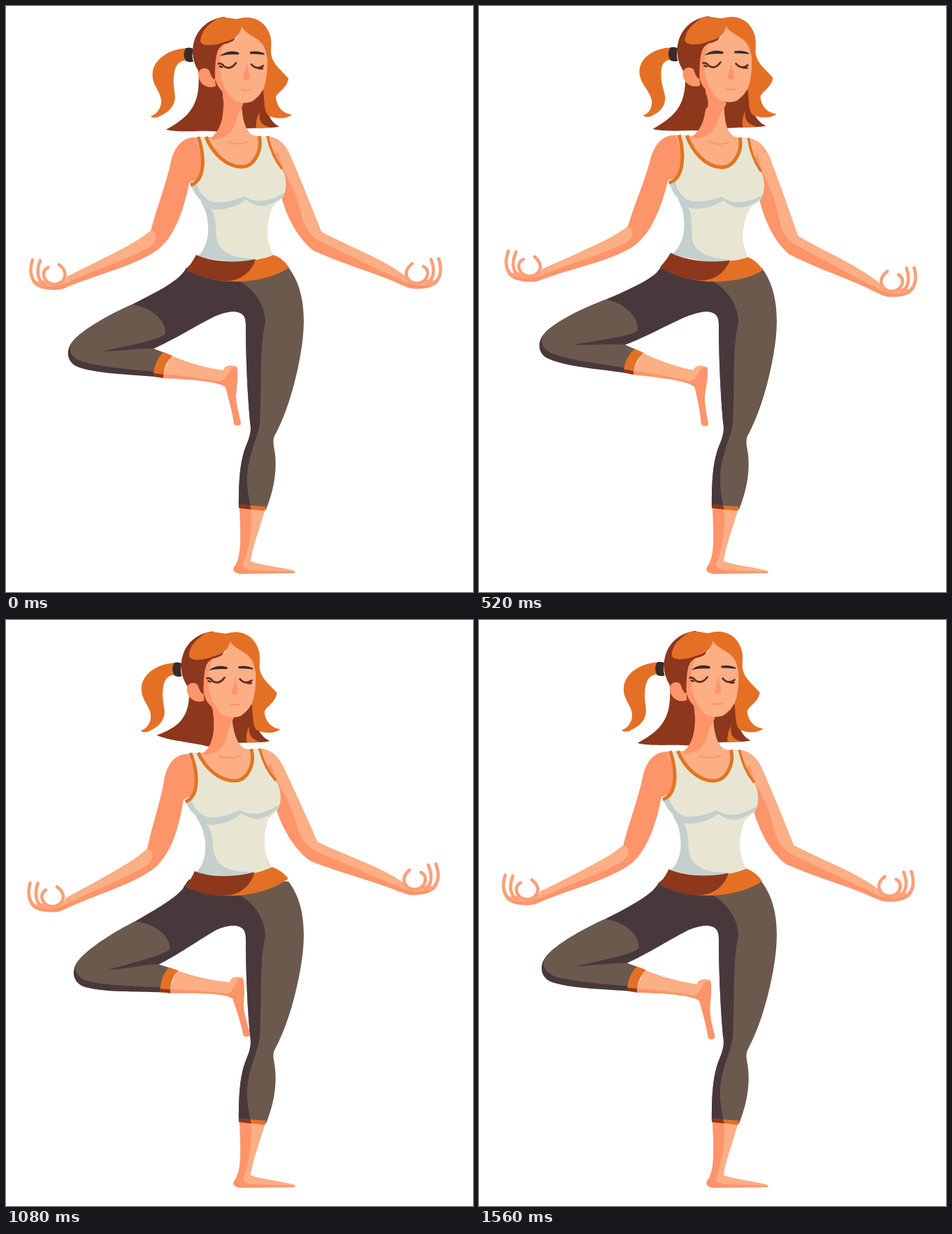
Animation of 668 by 838 pixels, one loop 1.6 s. Source, as an HTML page:

```html
<!DOCTYPE html>
<html lang="en">
<head>
<meta charset="utf-8">
<title>Tree pose</title>
<style>
  html, body { margin: 0; width: 100%; height: 100%; overflow: hidden; background: #fff; }
  svg { display: block; width: 668px; height: 838px; }
  .skin { fill: #fcae85; }
  .blush { fill: #fd946a; }
  .hair { fill: #e47025; }
  .brown { fill: #8d371c; }
  .cloth { fill: #6c594e; }
  .dusk { fill: #49383b; }
  .top { fill: #e8e6d2; }
  .fold { fill: #c3d0cd; }
  .ink { fill: #3b2a28; }
  .line { fill: none; stroke-linecap: round; stroke-linejoin: round; }
</style>
</head>
<body>
<svg viewBox="0 0 668 838">
  <defs>
    <g id="hand">
      <path class="blush" d="M93 386C85 390 83 396 70 397L52 394C44 396 39 393 36 386C35 401 52 406 70 406C82 406 86 402 94 399Z"/>
      <path class="skin" d="M93 385C85 389 83 395 70 397L50 392L42 396C52 403 72 403 92 394Z"/>
      <g class="line" stroke="#fc9f78" stroke-width="4.6">
        <path d="M38 363C33 379 35 392 47 399M49 364C43 379 45 392 55 399"/>
        <path d="M60 374C49 379 53 397 69 398C83 398 92 382 76 370"/>
      </g>
    </g>
  </defs>

  <!-- standing leg -->
  <path class="skin" d="M334 715L371 719C362 750 352 775 350 794C370 801 400 803 413 808C415 811 412 811 408 811L335 812C325 811 323 805 328 800C337 785 336 760 334 715Z"/>
  <path class="blush" d="M334 715L350 717C353 750 347 772 343 788C338 800 336 804 350 807L413 809C415 811 412 811 408 811L335 812C325 811 323 805 328 800C337 785 336 760 334 715Z"/>
  <path class="cloth" d="M262 371L404 374C428 405 430 450 421 500C412 550 398 590 384 615C382 620 382 625 384 635C389 665 382 695 372 720L333 717C333 680 334 650 345 625C350 612 351 605 349 595C345 550 343 500 343 455C343 442 337 438 327 437C318 437 310 439 303 442L270 440L254 382Z"/>
  <path class="dusk" d="M262 371L320 388C350 396 371 425 371 452C362 490 366 550 363 595C362 612 352 630 347 655C342 680 347 700 350 718L333 717C333 680 334 650 345 625C350 612 351 605 349 595C345 550 343 500 343 455C343 442 337 438 327 437C318 437 310 439 303 442L270 440L254 382Z"/>
  <path class="hair" d="M333 713L372 716L370 722L333 718Z"/>
  <path class="brown" d="M333 713L349 714L351 720L333 718Z"/>

  <!-- bent leg -->
  <g id="leg">
    <path class="skin" d="M236 500C265 512 290 518 311 521C312 514 322 512 330 516C333 530 329 545 329 560C330 575 335 590 336 597C335 601 328 601 326 597C324 580 318 560 314 545C305 537 270 534 222 532Z"/>
    <path class="blush" d="M222 526C260 529 295 535 306 537C316 535 317 525 321 520Q326 515 330 516C333 530 329 545 329 560C330 575 335 590 336 597C335 601 328 601 326 597C324 580 318 560 314 545C305 537 270 534 222 532Z"/>
    <path class="dusk" d="M258 374C250 390 230 402 180 427C150 440 110 462 95 480C85 492 87 508 100 515C125 526 180 527 212 530L228 498L211 490C240 478 280 452 303 442L310 436V394Z"/>
    <path class="cloth" d="M180 427C205 430 229 448 228 468C226 474 200 481 136 494C165 494 190 489 211 490L230 497L211 523C165 518 125 515 105 507C92 501 88 490 95 480C110 462 150 440 180 427Z"/>
    <path class="hair" d="M225 495L238 500C230 508 225 520 225 532L211 530C211 515 217 503 225 495Z"/>
    <path class="brown" d="M211 525L225 527V532L211 530Z"/>
  </g>

  <!-- hair behind the neck -->
  <g id="back">
    <g id="tail">
      <path class="hair" d="M258 61C236 62 215 74 210 92C205 113 222 122 221 138C220 150 212 156 206 158C208 161 214 161 219 158C233 152 241 142 241 130C240 118 238 110 240 98C242 84 248 79 258 78Z"/>
    </g>
    <path id="flap" class="brown" d="M275 92C279 140 265 158 229 178C250 183 280 178 302 180L322 175L318 120L290 100Z"/>
    <g id="lock">
      <path class="brown" d="M325 130L328 177C358 174 375 176 391 173C382 168 378 163 374 150L370 120Z"/>
      <path class="hair" d="M363 152C361 165 366 172 379 174L358 175C357 168 359 158 363 152Z"/>
    </g>
    <path class="hair" d="M345 17C367 18 381 34 379 62C378 82 392 90 404 104C402 118 390 122 386 131C388 148 398 154 409 156C400 163 385 162 375 157C369 150 370 140 368 120L340 40Z"/>
  </g>

  <g id="body">
    <g id="armL">
      <path class="blush" d="M274 188C250 186 240 205 236 222C229 255 215 290 207 322C195 334 150 356 88 387L92 400C140 381 180 372 212 352C240 335 255 290 262 253L290 240Z"/>
      <path class="skin" d="M207 321C218 324 217 337 205 345C170 364 120 380 90 395L87 387C130 366 180 344 207 321Z"/>
      <use href="#hand"/>
    </g>
    <g id="armR">
      <path class="blush" d="M372 186C392 187 402 202 408 217C422 250 438 290 451 323C490 344 540 362 572 387L566 399C530 382 490 372 440 350C420 335 402 305 393 270L370 210Z"/>
      <path class="skin" d="M372 186C392 187 402 202 408 217C422 250 438 290 451 323C490 344 540 362 572 387L568 393C530 376 490 356 450 337C428 325 424 306 420 288C412 255 395 240 389 208L380 215Z"/>
      <use href="#hand" transform="translate(657 -1.5) scale(-1 1)"/>
    </g>
    <path class="skin" d="M270 188L295 187C310 175 314 150 309 118L337 140C338 160 342 184 358 186L378 187L370 240H290Z"/>
    <path class="blush" d="M294 188C310 175 314 150 309 118L340 138C336 150 332 152 330 160C326 178 318 190 294 191Z"/>
    <path class="line" d="M316 194Q332 200 347 194" stroke="#fd946a" stroke-width="2"/>
    <path class="top" d="M274 188L286 187C295 210 315 231 337 231C356 231 366 205 361 187L374 187C378 205 385 222 394 232C400 240 402 255 399 266C396 278 384 282 381 288C371 312 371 335 383 357L340 368L273 359C290 345 291 320 288 305C287 292 280 284 278 277C270 270 266 260 263 255C283 250 287 225 274 188Z"/>
    <path class="fold" d="M264 255L272 251C276 268 287 280 300 281C320 281 330 276 341 272C354 282 376 281 398 267C396 276 386 279 381 282C366 290 354 285 343 277C330 288 305 294 292 290C303 300 298 320 302 335C306 352 325 362 357 361L340 368L273 359C290 345 291 320 288 305C287 292 280 284 278 277C270 270 266 260 264 255Z"/>
    <g class="line" stroke="#e07522" style="stroke-linecap:butt">
      <path d="M275 187C284 213 286 249 264 256M286 187C295 210 315 230 337 230C356 230 367 205 362 186" stroke-width="5"/>
      <path d="M374 186C378 205 386 222 395 233" stroke-width="3.5"/>
    </g>
    <path class="hair" d="M272 356C295 367 350 370 383 356C395 361 401 368 405 374C370 398 300 402 258 377C263 371 268 364 272 356Z"/>
    <path class="brown" d="M272 356C295 367 330 368 357 362C352 380 335 394 314 393C290 392 270 385 258 377C263 371 268 364 272 356Z"/>
  </g>

  <g id="head">
    <path class="ink" d="M257 61Q263 59 268 62Q265 71 268 80Q262 82 257 79Q252 70 257 61Z"/>
    <path class="brown" d="M312 16C281 20 266 44 267 68C268 84 274 90 277 97L300 106L320 60L337 30Z"/>
    <path class="brown" d="M283 115C299 110 313 125 311 145L300 160L275 150Z"/>
    <path class="skin" d="M336 28C345 46 373 40 374 75C374 110 370 125 352 137C336 143 318 135 309 122C302 115 299 107 299 98C298 75 300 62 312 55C328 52 334 44 336 28Z"/>
    <path class="blush" d="M299 85C299 75 303 62 312 55Q304 72 306 92C308 112 316 128 330 138C318 134 312 127 309 122C302 115 299 107 299 98Z"/>
    <path class="blush" d="M300 115C288 120 276 112 275 99C276 87 289 87 294 96L299 105Z"/>
    <path class="brown" d="M285 80C291 90 292 101 298 106C300 92 298 75 304 62L290 55Z"/>
    <path class="hair" d="M278 50C279 36 290 26 303 18C316 15 325 20 332 19C345 15 358 18 365 25C377 34 381 46 379 62C378 85 373 120 368 128C374 100 376 80 372 68C369 45 345 45 337 30C334 44 327 48 312 52C298 58 279 59 278 50Z"/>
    <path class="ink" d="M306 72Q318 62 333 67Q334 70 331 70Q318 69 306 72ZM349 66Q362 64 370 69Q370 71 367 70Q358 69 349 69Z"/>
    <g class="line" stroke="#5f2e23" stroke-width="2.7">
      <path d="M304 83Q309 82 312 87Q321 93 329 82M351 84Q359 93 368 86M309 88L306 87M362 90L367 90"/>
    </g>
    <path class="blush" d="M344 78C345 88 340 98 339 104Q344 109 349 104C348 96 345 90 344 78Z"/>
    <path class="line" d="M337 120Q343 122 350 120" stroke="#f4916b" stroke-width="2"/>
  </g>
</svg>
<script>
  const LOOP = 1600, STEP = 40;
  const set = (id, transform) => document.getElementById(id).setAttribute('transform', transform);
  const about = (x, y, change) => `translate(${x} ${y}) ${change} translate(${-x} ${-y})`;

  function pose(time) {
    const phase = Math.floor(time % LOOP / STEP) * STEP / LOOP * 2 * Math.PI;
    const sway = Math.sin(phase) - 0.06 * Math.sin(2 * phase);
    const lag = 1 - Math.cos(phase);
    const headMove = `translate(${17.5 * sway} ${-0.6 - sway})`;

    set('body', `rotate(${3.3 * sway} 330 395)`);
    set('armL', `rotate(${-0.8 * sway} 260 210)`);
    set('armR', `rotate(${-0.8 * sway} 390 210)`);
    set('leg', `translate(${1.8 * lag} ${-lag}) rotate(${3.3 * sway} 285 400)`);
    set('head', headMove);
    set('back', headMove);
    // Loose hair trails behind the head.
    set('tail', about(256, 70, `skewX(${0.8 + 3.2 * sway + 3 * lag})`));
    set('flap', about(300, 150, `translate(${2 * lag} 0) skewY(${0.5 - 5.5 * sway + 3.5 * lag})`));
    set('lock', about(360, 140, `skewX(${3.5 * lag})`));
  }

  function tick(now) {
    pose(now);
    requestAnimationFrame(tick);
  }
  pose(0);
  requestAnimationFrame(tick);
</script>
</body>
</html>
```
